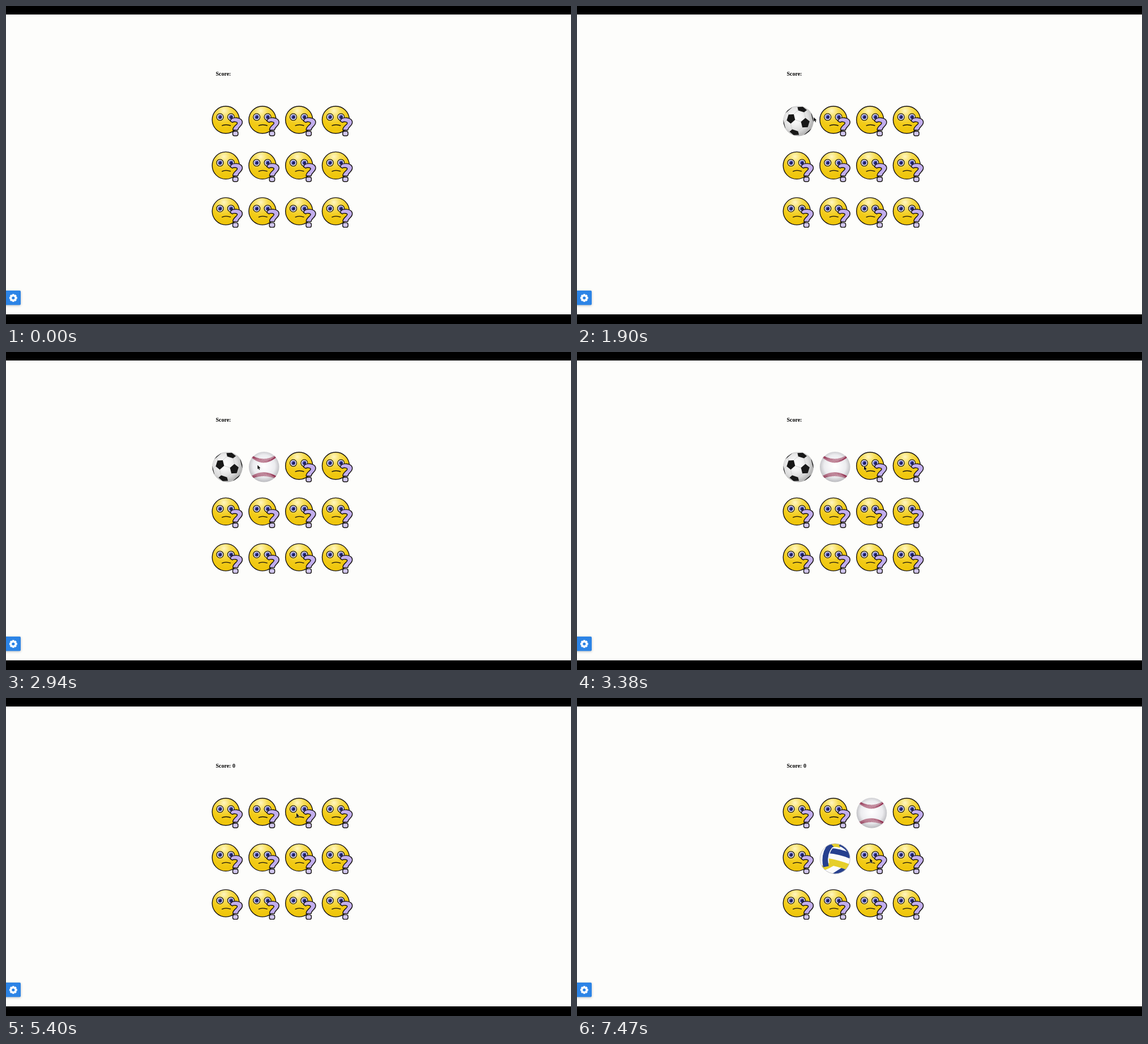
Write an HTML page with a canvas that moves like this. It is 998 px wide and 561 px high and loops after 8000 ms.

```html
<!DOCTYPE html>
<html lang="en">
<head>
<meta charset="utf-8">
<title>Memory game</title>
<style>
html, body { margin: 0; width: 100%; height: 100%; overflow: hidden; background: #fdfdfb; }
canvas { display: block; width: 998px; height: 561px; }
</style>
</head>
<body>
<canvas id="stage" width="998" height="561"></canvas>
<script>
const ctx = document.getElementById('stage').getContext('2d');
const LOOP = 8000;
const RESET = 4860;
const INK = '#15110f';
const TAU = Math.PI * 2;

const reveals = [
  { col: 0, row: 0, art: soccer, from: 1360, until: RESET },
  { col: 1, row: 0, art: baseball, from: 2560, until: RESET },
  { col: 2, row: 0, art: baseball, from: 5850, until: LOOP },
  { col: 1, row: 1, art: volleyball, from: 7020, until: LOOP }
];

// Pointer moves: start, end, x, y; it rests in between
const moves = [
  [1360, 1360, 385, 196],
  [1740, 2310, 444, 199.5],
  [2940, 3380, 507, 201],
  [3950, 4110, 600, 89],
  [RESET, RESET, 605.5, 73],
  [RESET, 5400, 513, 203],
  [6110, 6670, 440.5, 290],
  [7390, 7470, 517.5, 283]
];

function paint(fill, stroke, width = 1) {
  if (fill) { ctx.fillStyle = fill; ctx.fill(); }
  if (stroke) { ctx.strokeStyle = stroke; ctx.lineWidth = width; ctx.stroke(); }
}

function disc(x, y, r, fill, stroke, width) {
  ctx.beginPath();
  ctx.arc(x, y, r, 0, TAU);
  paint(fill, stroke, width);
}

function curve(color, width, x0, y0, cx, cy, x1, y1) {
  ctx.beginPath();
  ctx.moveTo(x0, y0);
  ctx.quadraticCurveTo(cx, cy, x1, y1);
  paint(null, color, width);
}

function radial(x, y, r, ...colors) {
  const g = ctx.createRadialGradient(x, y, 0, x, y, r);
  colors.forEach((c, i) => g.addColorStop(i / (colors.length - 1), c));
  return g;
}

function eye(x, y) {
  disc(x, y, 5.9, '#fff', INK, 1.3);
  disc(x, y, 3.7, radial(x - 1.2, y - 1, 4.5, '#8d90ee', '#4647b5', '#22236e'));
  disc(x, y, 1.7, '#15153f');
}

const hook = new Path2D('M32 27C33 22.5 38 20.8 43.5 21.2C50 21.7 54 25 53.4 30' +
  'C52.6 36 45.8 37.5 45.5 43H36.8C36 36.5 44 33.8 44.6 30.8C44.8 28 38 27.5 36 29.4Z');

function face() {
  disc(24.2, 24.7, 24, radial(21, 9, 36, '#fff6c0', '#f7dc55', '#f2cb18', '#efc60c'), INK, 1.4);
  eye(14, 19.8);
  eye(33.4, 19.8);
  curve(INK, 1.4, 17.2, 35.2, 24, 31.8, 33, 35);
  ctx.lineJoin = 'round';
  ctx.fillStyle = '#c2aeee';
  ctx.fill(hook);
  ctx.stroke(hook);
  ctx.beginPath();
  ctx.roundRect(36.5, 45, 9.4, 8, 3);
  paint('#d0c6ee', INK, 1.4);
}

// Balls are centred on the card and cut to a circle
function ball(shade, draw) {
  ctx.translate(27, 26.8);
  disc(0, 0, 26.8, shade);
  ctx.save();
  ctx.clip();
  draw();
  ctx.restore();
}

// A soccer ball is a truncated icosahedron seen from the front
const dot = (a, b) => a[0] * b[0] + a[1] * b[1] + a[2] * b[2];
const mix = (a, p, b, q) => a.map((v, i) => v * p + b[i] * q);
const unit = a => a.map(v => v / Math.hypot(...a));
const cross = (a, b) => a.map((_, i) =>
  a[(i + 1) % 3] * b[(i + 2) % 3] - a[(i + 2) % 3] * b[(i + 1) % 3]);

function icosahedron(top, toward) {
  const u = unit(mix(toward, 1, top, -dot(top, toward)));
  const w = cross(top, u);
  const half = [top];
  for (let k = 0; k < 5; k++) {
    const a = k * TAU / 5;
    const side = mix(u, Math.cos(a), w, Math.sin(a));
    half.push(mix(top, 1 / Math.sqrt(5), side, 2 / Math.sqrt(5)));
  }
  return half.concat(half.map(v => v.map(n => -n)));
}

const corners = icosahedron(unit([-0.52, -0.17, 0.84]), unit([0.48, 0.15, 0.86]));

// Points behind the ball slide onto its rim
function project(p) {
  const [x, y, z] = unit(p);
  const k = 26.8 / (z < 0 ? Math.hypot(x, y) : 1);
  return [x * k, y * k];
}

function soccer() {
  ball(radial(-5, -5, 34, '#ffffff', '#f3f3f3', '#dcdcdc', '#a8a8a8'), () => {
    for (const v of corners.filter(c => c[2] > -0.3)) {
      const near = corners.filter(n => dot(v, n) > 0.4 && dot(v, n) < 0.9);
      const points = near.map(n => mix(v, 2 / 3, n, 1 / 3));
      near.forEach((n, i) => {
        ctx.beginPath();
        ctx.moveTo(...project(points[i]));
        ctx.lineTo(...project(mix(v, 0.5, n, 0.5)));
        paint(null, '#cbcbcb', 0.8);
      });
      // Sort the corners around the patch
      const u = unit(mix(near[0], 1, v, -dot(v, near[0])));
      const w = cross(v, u);
      const turn = p => Math.atan2(dot(p, w), dot(p, u));
      ctx.beginPath();
      points.sort((a, b) => turn(a) - turn(b)).forEach(p => ctx.lineTo(...project(p)));
      ctx.closePath();
      paint('#181818');
    }
  });
}

function seam(side, mid, bend) {
  ctx.beginPath();
  for (let x = -22; x <= 22; x += 2.2) {
    const y = side * (mid + x * x * bend);
    const lean = x * 0.09 * side;
    ctx.moveTo(x - lean - 0.7, y - 3.5);
    ctx.lineTo(x, y);
    ctx.lineTo(x + lean - 0.7, y + 3.5);
  }
  paint(null, '#8e1f42', 1.1);
}

function baseball() {
  ball(radial(0, -2, 29, '#ffffff', '#f7f7f9', '#ececef', '#b9b9bd'), () => {
    seam(-1, 11, 0.0165);
    seam(1, 12.9, 0.0118);
  });
}

function volleyball() {
  const blue = '#26408f', white = '#fbfbfb', yellow = '#e6cf2a';
  ball(white, () => {
    curve(yellow, 8, -6, -24, 2, -26, 10, -23);
    curve(blue, 6, 8, -25, 18, -22, 25, -12);
    // Lower bands rise to the right, upper bands fall across them
    [yellow, white, blue].forEach((c, i) =>
      curve(c, 9, -26 + i * 9, 18 + i * 8, -12 + i * 8, 14 + i * 6, 2 + i * 9, 4 + i * 6));
    [blue, white, yellow].forEach((c, i) =>
      curve(c, 11, -12, -13 + i * 9, 6, -14 + i * 11, 27, -4 + i * 10));
    curve(blue, 10, -6, -25, -21, -10, -16, 14);
    curve(white, 1.5, -4, -20, -14, -8, -11, 8);
  });
  disc(0, 0, 26.5, null, '#b4b4b8', 0.8);
}

function gear() {
  const blue = '#2c84e6';
  ctx.save();
  ctx.shadowColor = 'rgba(0,0,0,.25)';
  ctx.shadowBlur = 4;
  ctx.shadowOffsetY = 1;
  ctx.beginPath();
  ctx.roundRect(-4, 502, 30, 25.6, 2);
  paint(blue);
  ctx.restore();
  ctx.save();
  ctx.translate(12.8, 515);
  ctx.fillStyle = '#fff';
  for (let i = 0; i < 8; i++) {
    ctx.fillRect(-1.8, -6.9, 3.6, 4);
    ctx.rotate(TAU / 8);
  }
  disc(0, 0, 5.6, '#fff');
  disc(0, 0, 2.6, blue);
  ctx.restore();
}

const arrow = new Path2D('M0 0V7.3L1.6 5.8L2.8 8.6L4 8.1L2.9 5.4L5 5.2Z');

function pointer(t) {
  let x, y;
  for (const [from, to, tx, ty] of moves) {
    if (t < from) break;
    const k = to > from ? Math.min(1, (t - from) / (to - from)) : 1;
    x = k < 1 ? x + (tx - x) * (1 - (1 - k) ** 2.5) : tx;
    y = k < 1 ? y + (ty - y) * k * k : ty;
  }
  if (x === undefined) return;
  ctx.save();
  ctx.translate(x, y);
  ctx.lineWidth = 1;
  ctx.strokeStyle = 'rgba(255,255,255,.6)';
  ctx.stroke(arrow);
  ctx.fillStyle = '#0a0a0a';
  ctx.fill(arrow);
  ctx.restore();
}

function draw(t) {
  ctx.fillStyle = '#000';
  ctx.fillRect(0, 0, 998, 561);
  ctx.fillStyle = '#fdfdfb';
  ctx.fillRect(0, 15, 998, 529);

  ctx.fillStyle = '#000';
  ctx.font = 'bold 10px "Liberation Serif", serif';
  ctx.fillText(t < RESET ? 'Score:' : 'Score: 0', 370.4, 123);

  for (let row = 0; row < 3; row++) {
    for (let col = 0; col < 4; col++) {
      const open = reveals.find(r =>
        r.col === col && r.row === row && t >= r.from && t < r.until);
      ctx.save();
      ctx.translate(364 + col * 64.75, 176 + row * 80.7);
      (open ? open.art : face)();
      ctx.restore();
    }
  }
  gear();
  pointer(t);
}

const start = performance.now();
function tick() {
  draw((performance.now() - start) % LOOP);
  requestAnimationFrame(tick);
}
tick();
</script>
</body>
</html>
```
